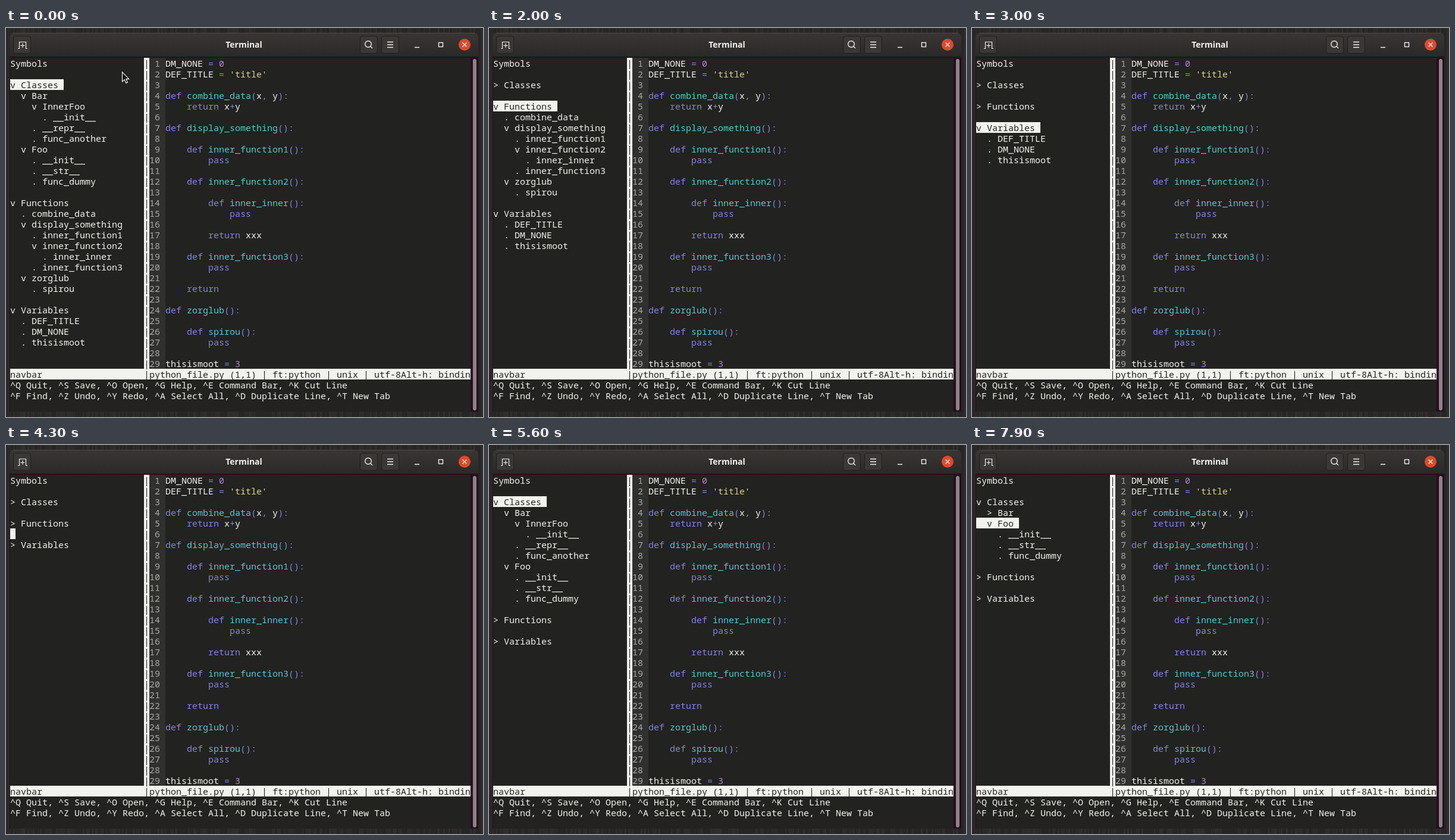
An HTML page for the animation above (8 s loop, 802 by 653 pixels).

```html
<!DOCTYPE html>
<html lang="en">
<head>
<meta charset="utf-8">
<title>Terminal</title>
<style>
  html, body { margin: 0; width: 100%; height: 100%; overflow: hidden; background: #252423; }
  svg { display: block; }
  text { white-space: pre; font: 15px "Noto Sans Mono", "DejaVu Sans Mono", monospace; fill: #f2f2ee; }
  .title { font: bold 14px "Noto Sans", "Open Sans", sans-serif; text-anchor: middle; }
  .dark { fill: #222220; }
  .gutter { fill: #a9a9a4; }
  .key { fill: #8583df; }
  .name { fill: #58c7cd; }
  .str { fill: #d9d58c; }
  .num { fill: #b080d8; }
  .button { fill: #3a3836; stroke: #201e1d; }
  .icon { fill: none; stroke: #eeeeec; stroke-width: 1.4; }
</style>
</head>
<body>
<svg id="stage" width="802" height="653" viewBox="0 0 802 653">
  <defs>
    <linearGradient id="header" x2="0" y2="1">
      <stop stop-color="#393634"/><stop offset="1" stop-color="#2b2928"/>
    </linearGradient>
  </defs>
  <rect width="802" height="653" fill="#272625"/>
  <g id="grain"></g>
  <path d="M6 644V16q0-8 8-8H786q8 0 8 8V644z" fill="#2b0a22"/>
  <path d="M6 48V16q0-8 8-8H786q8 0 8 8V48z" fill="url(#header)"/>
  <path d="M12 8.5H788" stroke="#4a4745"/>
  <path d="M6 48.5H794" stroke="#1b1718"/>
  <g class="button">
    <rect x="12.5" y="13.5" width="29" height="29" rx="4"/>
    <rect x="595.5" y="13.5" width="29" height="29" rx="4"/>
    <rect x="631.5" y="13.5" width="29" height="29" rx="4"/>
  </g>
  <g class="icon">
    <path d="M20.5 34.5H22.5V23.5H33.5V34.5H35M20 34.5H23M33 34.5H36M28 26V33M24.5 29.5H31.5" stroke-width="1.2"/>
    <circle cx="609" cy="27" r="5.3"/>
    <path d="M613 31L616 34M641 23.5H651M641 28H651M641 32.5H651M687 32.5H695"/>
    <rect x="727.5" y="24.5" width="7" height="7"/>
  </g>
  <circle cx="771" cy="28" r="10" fill="#e0492a"/>
  <path class="icon" d="M767.5 24.5L774.5 31.5M774.5 24.5L767.5 31.5"/>
  <text class="title" x="400" y="33">Terminal</text>

  <rect x="7" y="50" width="774" height="594" fill="#222220"/>
  <rect x="241" y="50" width="27" height="522" fill="#30302f"/>
  <rect x="232" y="50" width="9" height="522" fill="#f2f2ee"/>
  <rect x="7" y="572" width="774" height="18" fill="#f2f2ee"/>
  <rect x="785" y="52" width="6" height="590" rx="3" fill="#8b8583"/>
  <g id="screen"></g>
  <g id="sidebar"></g>
  <path id="pointer" d="M195.5 74V90L199.2 86.6L201.8 92.4L204.4 91.2L201.8 85.6H206.7Z"
        fill="#111" stroke="#fff" stroke-width="1.1"/>
</svg>
<script>
const LOOP = 8000, LEFT = 7, TOP = 50, CELL = 9, ROW = 18;

const TREE = `Symbols

v Classes
  v Bar
    v InnerFoo
      . __init__
    . __repr__
    . func_another
  v Foo
    . __init__
    . __str__
    . func_dummy

v Functions
  . combine_data
  v display_something
    . inner_function1
    v inner_function2
      . inner_inner
    . inner_function3
  v zorglub
    . spirou

v Variables
  . DEF_TITLE
  . DM_NONE
  . thisismoot`.split("\n");

const CODE = `DM_NONE = 0
DEF_TITLE = 'title'

def combine_data(x, y):
    return x+y

def display_something():

    def inner_function1():
        pass

    def inner_function2():

        def inner_inner():
            pass

        return xxx

    def inner_function3():
        pass

    return

def zorglub():

    def spirou():
        pass

thisismoot = 3`.split("\n");

// [start time, selected row, folded nodes]
const ALL = "Classes Functions Variables", LOWER = "Functions Variables";
const STEPS = [
  [0, 2, ""],
  [1000, 2, "Classes"],
  [1700, 3, "Classes"],
  [2000, 4, "Classes"],
  [2500, 4, "Classes Functions"],
  [2700, 5, "Classes Functions"],
  [3000, 6, "Classes Functions"],
  [3500, 6, ALL],
  [4300, 5, ALL],
  [4500, 4, ALL],
  [5000, 3, ALL],
  [5500, 2, ALL],
  [5600, 2, LOWER],
  [7000, 3, LOWER],
  [7500, 3, LOWER + " Bar"],
  [7900, 4, LOWER + " Bar"]
];

const $ = id => document.getElementById(id);
const escapeText = s => s.replace(/&/g, "&amp;").replace(/</g, "&lt;").replace(/>/g, "&gt;");
const markup = (col, row, content, cls = "") =>
  `<text class="${cls}" x="${LEFT + col * CELL}" y="${TOP + row * ROW + 15}">${content}</text>`;
const line = (col, row, s, cls) => markup(col, row, escapeText(s), cls);

function highlight(source) {
  let previous = "";
  return source.replace(/'.*?'|\w+|[^\w\s]/g, token => {
    const cls = token[0] === "'" ? "str"
      : /^\d/.test(token) ? "num"
      : previous === "def" ? "name"
      : /^(def|return|pass|\W)$/.test(token) ? "key" : "";
    previous = token;
    return `<tspan class="${cls}">${escapeText(token)}</tspan>`;
  });
}

function visibleLines(folded) {
  let limit = Infinity;
  const lines = [];
  for (const entry of TREE) {
    const indent = entry.search(/\S/);
    if (indent > limit) continue;
    const closed = folded.includes(entry.trim().slice(2)) && entry.trim()[0] === "v";
    limit = closed ? indent : Infinity;
    lines.push(closed ? entry.replace("v", ">") : entry);
  }
  return lines;
}

function drawScreen() {
  let out = "";
  CODE.forEach((source, row) => {
    out += line(25, row, "|", "dark")
      + line(26, row, String(row + 1).padStart(2), "gutter")
      + markup(29, row, highlight(source));
  });
  out += line(0, 29, "navbar", "dark")
    + line(25, 29, "|python_file.py (1,1) | ft:python | unix | utf-8Alt-h: bindin", "dark")
    + line(0, 30, "^Q Quit, ^S Save, ^O Open, ^G Help, ^E Command Bar, ^K Cut Line")
    + line(0, 31, "^F Find, ^Z Undo, ^Y Redo, ^A Select All, ^D Duplicate Line, ^T New Tab");
  $("screen").innerHTML = out;
}

function drawGrain() {
  let out = "";
  for (let x = 0; x < 802; x += 3) {
    const shade = Math.abs(Math.sin(x * 12.9898) * 43758.5453) % 1;
    out += `<rect x="${x}" width="${1 + shade * 2}" height="653" fill="${shade > 0.5 ? "#fff" : "#000"}" opacity="${0.04 * shade}"/>`;
  }
  $("grain").innerHTML = out;
}

function drawSidebar([, selected, folded]) {
  const lines = visibleLines(folded.split(" "));
  const width = (lines[selected].length + 1) * CELL;
  $("sidebar").innerHTML =
    `<rect x="${LEFT}" y="${TOP + selected * ROW}" width="${width}" height="${ROW}" fill="#f2f2ee"/>`
    + lines.map((s, row) => line(0, row, s, row === selected ? "dark" : "")).join("");
}

let shown;
function render(time) {
  const t = time % LOOP;
  const step = STEPS.findLast(([start]) => start <= t);
  if (step !== shown) drawSidebar(shown = step);
  $("pointer").style.display = t < 500 ? "" : "none";
}

drawGrain();
drawScreen();
render(0);
const origin = performance.now();
function tick() {
  render(performance.now() - origin);
  requestAnimationFrame(tick);
}
requestAnimationFrame(tick);
</script>
</body>
</html>
```
